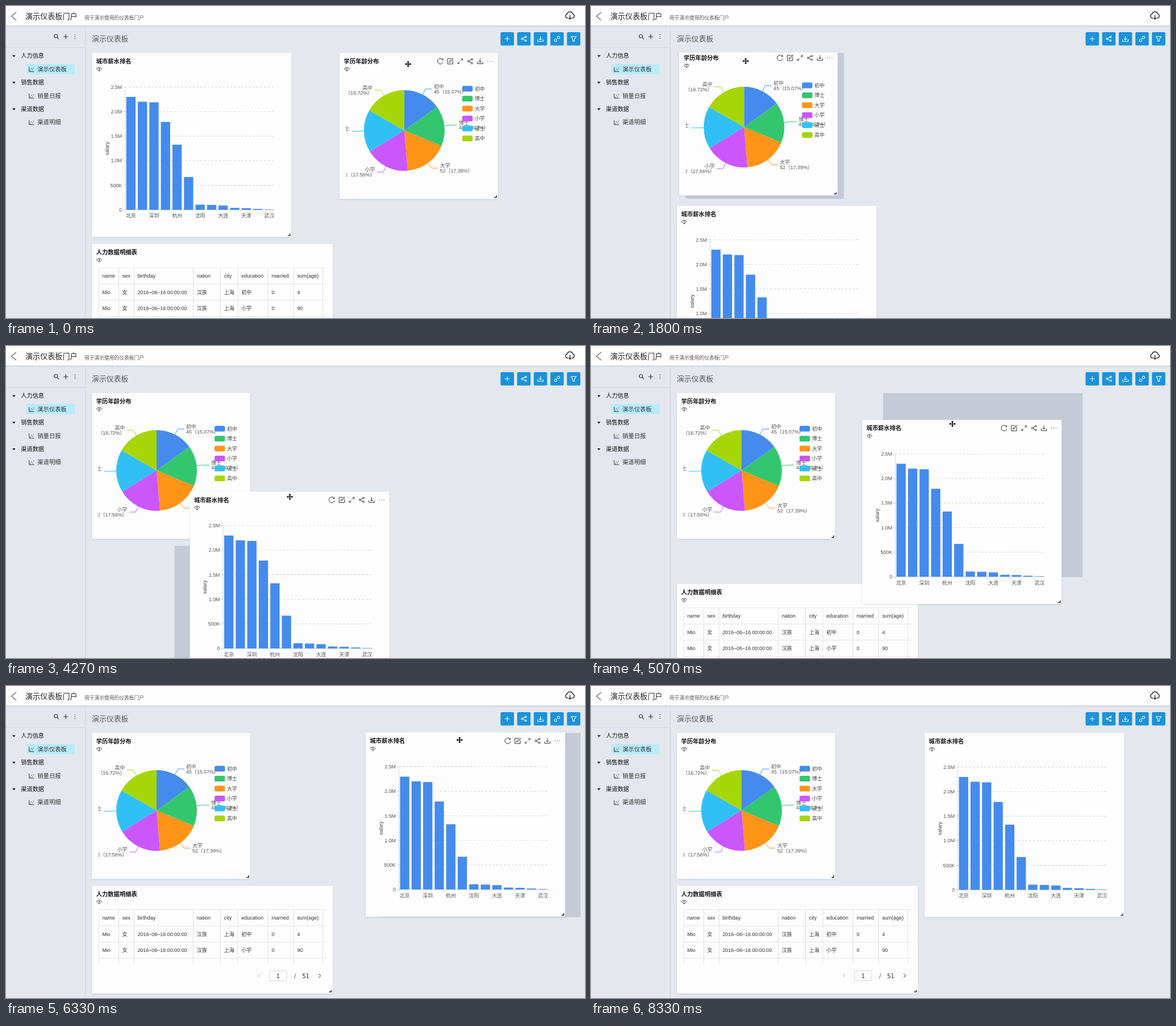
An HTML page with a canvas for the animation above (8390 ms loop, 1019 px wide and 549 px high).

```html
<!DOCTYPE html>
<html lang="zh-CN">
<head>
<meta charset="utf-8">
<title>演示仪表板</title>
<style>
html, body { margin: 0; width: 100%; height: 100%; overflow: hidden; background: #e4e8ee; }
canvas { display: block; width: 1019px; height: 549px; }
</style>
</head>
<body>
<canvas id="stage"></canvas>
<script>
const W = 1019, H = 549, LOOP = 8390, STEP = 200 / 3;
const canvas = document.getElementById('stage');
const ctx = canvas.getContext('2d');
const dpr = window.devicePixelRatio || 1;
canvas.width = W * dpr;
canvas.height = H * dpr;

// Grid
const PX = 72.65, PY = 67.2, X0 = 151.2, Y0 = 82.7, GAP = 12;
const colX = c => X0 + c * PX, rowY = r => Y0 + r * PY;
const span = (n, pitch) => n * pitch - GAP;
const snap = x => Math.round((x - X0) / PX);

// Timing
const PIE_GRAB = 520, PIE_DROP = 2070, BAR_GRAB = 3640, BAR_DROP = 6960, LEAVE = 7600;
const SLOT_MS = 125, CARD_MS = 200;
const LAG = 18, PIE_GRIP = [120.6, 19.5], BAR_GRIP = [166.3, 12.8];
const PIE_PATH = [[520, 587.1, 82.7], [700, 574, 82], [850, 520, 79], [917, 478, 76.5], [1000, 430, 73.9],
  [1100, 380, 72.5], [1300, 310, 74], [1550, 262, 72], [1740, 187, 75.2], [1800, 155.5, 76.8], [1900, 147, 80], [2070, 150, 82]];
const BAR_PATH = [[3640, 151.2, 351.5], [3900, 175, 340], [4200, 290, 270], [4500, 450, 215], [4750, 538, 195],
  [4980, 515, 165], [5067, 477, 129.9], [5170, 444, 104], [5350, 458, 92], [5600, 560, 88], [5850, 628, 84],
  [6080, 648, 82], [6333, 633, 82.1], [6600, 618, 83], [6960, 600, 84]];

const clamp = v => Math.min(1, Math.max(0, v));

// Cubic Hermite through the points, flat at turning points
function along(path, t, k) {
  const n = path.length - 1;
  if (t <= path[0][0]) return path[0][k];
  if (t >= path[n][0]) return path[n][k];
  const i = path.findIndex(p => p[0] > t) - 1;
  const slope = j => {
    if (j < 1 || j >= n) return 0;
    const [a, b, c] = [path[j - 1], path[j], path[j + 1]];
    return (b[k] - a[k]) * (c[k] - b[k]) <= 0 ? 0 : (c[k] - a[k]) / (c[0] - a[0]);
  };
  const a = path[i], b = path[i + 1], d = b[0] - a[0], u = (t - a[0]) / d, v = 1 - u;
  return a[k] * (1 + 2 * u) * v * v + b[k] * u * u * (3 - 2 * u) + d * u * v * (v * slope(i) - u * slope(i + 1));
}

// CSS "ease": cubic-bezier(.25, .1, .25, 1)
function ease(x) {
  x = clamp(x);
  let lo = 0, hi = 1, s = x;
  for (let i = 0; i < 20; i++) {
    s = (lo + hi) / 2;
    if (.75 * s * (1 - s) + s ** 3 < x) lo = s; else hi = s;
  }
  return .3 * s * (1 - s) ** 2 + 3 * s * s * (1 - s) + s ** 3;
}

// A value that follows a jumping goal with a CSS-like transition
function track(goal, ms) {
  const legs = [{ t: -1e4, from: goal(0), to: goal(0) }];
  const at = t => {
    let i = legs.length - 1;
    while (i && legs[i].t > t) i--;
    const { t: start, from, to } = legs[i];
    return from + (to - from) * ease((t - start) / ms);
  };
  for (let t = 0; t < LOOP; t++) {
    const to = goal(t);
    if (to !== legs[legs.length - 1].to) legs.push({ t, from: at(t), to });
  }
  return at;
}

const pieCol = t => t >= PIE_DROP ? 0 : snap(along(PIE_PATH, t, 1));
const barCol = t => t >= BAR_DROP ? 6 : snap(along(BAR_PATH, t, 1));
const barRow = t => t < BAR_GRAB ? (pieCol(t) < 5 ? 4 : 0) : (barCol(t) < 4 ? 4 : 0);
const tableRow = t => t < BAR_GRAB ? barRow(t) + 5 : barCol(t) < 4 ? 9 : barCol(t) < 6 ? 5 : 4;
const pieSlotX = track(t => colX(pieCol(t)), SLOT_MS);
const barSlotX = track(t => colX(barCol(t)), SLOT_MS);
const barSlotY = track(t => rowY(barRow(t)), SLOT_MS);
const barY = track(t => rowY(barRow(t)), CARD_MS);
const tableY = track(t => rowY(tableRow(t)), CARD_MS);

function settle(path, t, drop, x, y) {
  const u = ease((t - drop) / CARD_MS), px = along(path, t, 1), py = along(path, t, 2);
  return [px + (x - px) * u, py + (y - py) * u];
}

function pointer(t) {
  if (t > LEAVE) return null;
  if (t < PIE_DROP) return [1, 2].map(k => along(PIE_PATH, t + LAG, k) + PIE_GRIP[k - 1]);
  if (t >= BAR_GRAB) return [1, 2].map(k => along(BAR_PATH, t + LAG, k) + BAR_GRIP[k - 1]);
  const u = clamp((t - 2250) / 800), s = u * u * (3 - 2 * u);
  return [271 + 46.5 * s, 101.5 + 262.8 * s];
}

// Drawing helpers
const FONT = '"Liberation Sans", "Noto Sans CJK SC", "Noto Sans CJK", sans-serif';
function text(s, x, y, size = 8.9, color = '#444', align = 'left', weight = 400, family = FONT) {
  ctx.font = `${weight} ${size}px ${family}`;
  ctx.textAlign = align;
  ctx.fillStyle = color;
  ctx.fillText(s, x, y + size * .36);
}
function rect(x, y, w, h, color, r = 0) {
  ctx.fillStyle = color;
  ctx.beginPath();
  if (r) ctx.roundRect(x, y, w, h, r); else ctx.rect(x, y, w, h);
  ctx.fill();
}
function line(points, color, width = 1) {
  ctx.strokeStyle = color;
  ctx.lineWidth = width;
  ctx.beginPath();
  points.forEach(([x, y]) => ctx.lineTo(x, y));
  ctx.stroke();
}
function clipped(x, y, w, h, draw) {
  ctx.save();
  ctx.beginPath();
  ctx.rect(x, y, w, h);
  ctx.clip();
  draw();
  ctx.restore();
}
const ring = (x, y, r) => `M${x - r} ${y}a${r} ${r} 0 1 0 ${2 * r} 0a${r} ${r} 0 1 0 ${-2 * r} 0`;
const ICONS = {
  refresh: 'M4.3 -2.6A5 5 0 1 0 4.9 1M4.6 -5V-2.4H2',
  edit: 'M1.5 -4.6H-4.8V4.8H4.6V-1M-2 2L-1.6 .2L4 -5.4L5.4 -4L-.2 1.6Z',
  expand: 'M1.6 -4.2H4.2V-1.6M4.2 -4.2L.8 -.8M-1.6 4.2H-4.2V1.6M-4.2 4.2L-.8 .8',
  share: 'M-1.8 -.8L2 -2.8M-1.8 .8L2 2.8' + ring(-3.1, 0, 1.5) + ring(3.2, -3.3, 1.4) + ring(3.2, 3.3, 1.4),
  download: 'M0 -4.8V1.8M-2.4 -.4L0 2L2.4 -.4M-4.8 1V4.4H4.8V1',
  more: 'M-4.6 0h1.2M-.6 0h1.2M3.4 0h1.2',
  plus: 'M-4.2 0H4.2M0 -4.2V4.2',
  link: 'M-1.8 1.8L1.8 -1.8M-.4 -2.5L1.2 -4A2 2 0 0 1 4.1 -1.2L2.5 .4M.4 2.5L-1.2 4A2 2 0 0 1 -4.1 1.2L-2.5 -.4',
  filter: 'M-4.4 -4H4.4L1.4 .3V4.2H-1.4V.3Z',
  search: ring(-1, -1, 3) + 'M1.2 1.2L4.4 4.4',
  dots: 'M0 -4v1.3M0 -.6v1.3M0 2.8v1.3',
  chart: 'M-4.2 -4V4H4.4M-1.8 1.2v1.4M-.4 -1.6v1.4M1.6 .2v1.4M3.4 -2.8v1.4',
  cloud: 'M-3 4.2H-4.4A3.6 3.6 0 0 1 -5.2 -2.8A5.4 5.4 0 0 1 5.2 -2.8A3.6 3.6 0 0 1 4.4 4.2H3M0 -1V6M-2.2 3.9L0 6.2L2.2 3.9',
  widget: 'M-4.8 -.8Q0 -5.4 4.8 -.8L0 3.6ZM-1.6 -2.4L0 0L1.6 -2.4M0 0V3.4'
};
function icon(name, x, y, color = '#333', width = 1) {
  ctx.save();
  ctx.translate(x, y);
  ctx.strokeStyle = color;
  ctx.lineWidth = width;
  ctx.stroke(new Path2D(ICONS[name]));
  ctx.restore();
}

function card(title, w, h, hover) {
  ctx.save();
  ctx.shadowColor = 'rgba(40,50,80,.16)';
  ctx.shadowBlur = 3 * dpr;
  ctx.shadowOffsetY = dpr;
  rect(0, 0, w, h, '#fdfdfe', 1);
  ctx.restore();
  text(title, 7.5, 14.6, 10.3, '#111', 'left', 700);
  icon('widget', 12.8, 28.4, '#333', .8);
  line([[w - 2.6, h - 6.2], [w - 2.6, h - 2.8], [w - 6.4, h - 2.8]], '#222', 1.4);
  if (hover) ['refresh', 'edit', 'expand', 'share', 'download', 'more']
    .forEach((name, i) => icon(name, w - 101.3 + i * 17.5, 14.5));
}

const SLICES = [['初中', 15.07, 45, '#448bed'], ['博士', 16.2, 48, '#34c66e'], ['大学', 17.39, 52, '#ff9419'],
  ['小学', 17.56, 52, '#cb56f9'], ['硕士', 17.06, 51, '#31c0f5'], ['高中', 16.72, 50, '#a6d608']];
function pieCard(hover) {
  const w = span(4, PX), cx = 113.8, cy = 136.3, r = 71;
  card('学历年龄分布', w, span(4, PY), hover);
  clipped(11.3, 36, w - 22.6, 210, () => {
    let a = -Math.PI / 2;
    for (const [name, share, count, color] of SLICES) {
      const b = a + share / 50 * Math.PI, m = (a + b) / 2, side = Math.cos(m) < 0 ? -1 : 1;
      ctx.fillStyle = color;
      ctx.beginPath();
      ctx.moveTo(cx, cy);
      ctx.arc(cx, cy, r, a, b);
      ctx.fill();
      const at = d => [cx + d * Math.cos(m), cy + d * Math.sin(m)];
      const [ex, ey] = at(r + 11), tx = ex + side * 14.6, align = side < 0 ? 'right' : 'left';
      line([at(r), [ex, ey], [ex + side * 11, ey]], color);
      text(name, tx, ey - 4.2, 8.9, '#555', align);
      text(`${count}（${share}%）`, tx, ey + 4.5, 8.9, '#555', align);
      a = b;
    }
    SLICES.forEach(([name, , , color], i) => {
      const y = 62.8 + i * 17.5;
      rect(215.9, y - 5.1, 18.3, 10.2, color, 2.6);
      text(name, 237.8, y, 8.9, '#444');
    });
  });
}

const SALARY = [2.297, 2.2, 2.187, 1.79, 1.327, .667, .106, .1, .088, .04, .034, .02, .008];
const CITIES = ['北京', '深圳', '杭州', '沈阳', '大连', '天津', '武汉'];
function barCard(hover) {
  const left = 58.5, right = 322.4, base = 276, tall = 216.2, pitch = (right - left) / 13;
  card('城市薪水排名', span(5, PX), span(5, PY), hover);
  ['0', '500K', '1.0M', '1.5M', '2.0M', '2.5M'].forEach((label, i) => {
    const y = base - tall * i / 5;
    text(label, 53, y, 8.9, '#555', 'right');
    line([[left - 4, y], [left, y]], '#ccc', .8);
    if (!i) return;
    ctx.setLineDash([3.7, 2.9]);
    line([[left, y], [right, y]], '#cfcfd2', .8);
    ctx.setLineDash([]);
  });
  line([[left, base - tall], [left, base], [right, base]], '#cfcfd2', .8);
  SALARY.forEach((v, i) => {
    const h = v / 2.5 * tall;
    rect(left + pitch * i + 2, base - h, pitch - 4, h, '#448bed');
  });
  CITIES.forEach((city, i) => {
    const x = left + pitch * (2 * i + .5);
    line([[x - pitch / 2, base], [x - pitch / 2, base + 3.5]], '#ccc', .8);
    text(city, x, 286.5, 8.9, '#555', 'center');
  });
  ctx.save();
  ctx.translate(26.3, 168);
  ctx.rotate(-Math.PI / 2);
  text('salary', 0, 0, 9, '#444', 'center');
  ctx.restore();
}

const EDGES = [12, 47.3, 74, 178.3, 226.3, 256.8, 310, 355, 406.3];
const ROWS = [['name', 'sex', 'birthday', 'nation', 'city', 'education', 'married', 'sum(age)'],
  ['Mio', '女', '2016–06–16 00:00:00', '汉族', '上海', '初中', '0', '4'],
  ['Mio', '女', '2016–06–16 00:00:00', '汉族', '上海', '小学', '0', '90']];
function tableCard(hover) {
  const grid = '#e3e3e6', pitch = 28.5;
  card('人力数据明细表', span(6, PX), span(3, PY), hover);
  clipped(11.5, 41.5, 401, 96.5, () => {
    for (let i = 0; i < 4; i++) line([[12, 42 + i * pitch], [413, 42 + i * pitch]], grid);
    EDGES.forEach(x => line([[x, 42], [x, 140]], grid));
    ROWS.forEach((row, i) => row.forEach((s, j) =>
      text(s, EDGES[j] + 6.2, 56.5 + i * pitch, 8.95, '#333')));
  });
  const y = 158.4, num = '"DejaVu Sans", sans-serif';
  line([[296.5, y - 3.5], [292.5, y], [296.5, y + 3.5]], '#bbb');
  ctx.strokeStyle = '#d5d5d8';
  ctx.beginPath();
  ctx.roundRect(312.5, y - 8.8, 30.3, 17.6, 2);
  ctx.stroke();
  text('1', 327.7, y, 10, '#333', 'center', 400, num);
  text('/', 357.5, y, 10, '#555', 'center', 400, num);
  text('51', 376.3, y, 10, '#333', 'center', 400, num);
  line([[398.8, y - 3.5], [402.8, y], [398.8, y + 3.5]], '#333');
}

function chrome() {
  rect(0, 0, W, 34.4, '#fefefe');
  rect(0, 34.4, W, 1, '#c6cad0');
  rect(0, 35.4, W, 1, '#d6dae0');
  line([[18, 11], [9.5, 18], [18, 25]], '#666', 1.2);
  text('演示仪表板门户', 34, 18.5, 13.1, '#222');
  text('用于演示使用的仪表板门户', 138, 20.8, 8.75, '#555');
  icon('cloud', 992.5, 17, '#222', 1.3);

  rect(139, 36, 1, H, '#d3d7dd');
  rect(0, 72.5, 139, 1, '#d3d7dd');
  icon('search', 88.8, 54, '#333', 1.2);
  icon('plus', 105.2, 54, '#333', 1.2);
  icon('dots', 121.5, 54, '#333', 1.3);
  rect(36, 102, 85, 18, '#b8ecfd');
  [['人力信息', '演示仪表板'], ['销售数据', '销量日报'], ['渠道数据', '渠道明细']].forEach(([group, item], i) => {
    const y = 88 + i * 46.7;
    ctx.fillStyle = '#222';
    ctx.beginPath();
    [[11, y - 1.5], [16.8, y - 1.5], [13.9, y + 2]].forEach(p => ctx.lineTo(...p));
    ctx.fill();
    text(group, 26.3, y - .2, 10.2, '#111', 'left', 500);
    icon('chart', 45, y + 23.4, '#333', 1);
    text(item, 55.3, y + 23.3, 10.3, '#333');
  });

  text('演示仪表板', 151, 57.8, 12.9, '#555');
  ['plus', 'share', 'download', 'link', 'filter'].forEach((name, i) => {
    const x = 882.2 + i * 29.2;
    rect(x - 11.8, 46, 23.6, 23.6, '#1b92dc', 2);
    icon(name, x, 57.8, '#fff', 1.05);
  });
}

function moveCursor(x, y) {
  ctx.save();
  ctx.translate(x, y);
  const shape = new Path2D();
  [0, 1, 2, 3].forEach(i => shape.addPath(
    new Path2D('M-.7 0V-3H-2.4L0 -5.6L2.4 -3H.7V0Z'), new DOMMatrix().rotate(i * 90)));
  ctx.strokeStyle = '#fff';
  ctx.lineWidth = 1.8;
  ctx.stroke(shape);
  ctx.fillStyle = '#000';
  ctx.fill(shape);
  ctx.restore();
}

function draw(t) {
  ctx.setTransform(dpr, 0, 0, dpr, 0, 0);
  rect(0, 0, W, H, '#e4e8ee');
  chrome();

  const dragPie = t >= PIE_GRAB && t < PIE_DROP, dragBar = t >= BAR_GRAB && t < BAR_DROP;
  const pie = { pos: settle(PIE_PATH, t, PIE_DROP, X0, Y0), cols: 4, rows: 4, paint: pieCard, drag: dragPie };
  const bar = {
    pos: t < BAR_GRAB ? [X0, barY(t)] : settle(BAR_PATH, t, BAR_DROP, colX(6), Y0),
    cols: 5, rows: 5, paint: barCard, drag: dragBar
  };
  const table = { pos: [X0, tableY(t)], cols: 6, rows: 3, paint: tableCard };
  const cards = t < BAR_GRAB ? [table, bar, pie] : [table, pie, bar];

  const mouse = pointer(t);
  const under = ({ pos: [x, y], cols, rows }) => mouse && mouse[0] > x && mouse[0] < x + span(cols, PX) &&
    mouse[1] > y && mouse[1] < y + span(rows, PY);
  const hovered = cards.find(c => c.drag) || cards.slice().reverse().find(under);

  clipped(140, 82, W - 140, H - 82, () => {
    for (const c of cards) {
      if (c.drag) {
        const x = dragPie ? pieSlotX(t) : barSlotX(t), y = dragPie ? Y0 : barSlotY(t);
        rect(x, y, span(c.cols, PX), span(c.rows, PY), 'rgba(78,82,123,.2)');
      }
      ctx.save();
      ctx.translate(...c.pos);
      c.paint(c === hovered);
      ctx.restore();
    }
  });
  if (mouse && hovered) moveCursor(...mouse);
}

const start = performance.now();
function tick() {
  const t = (performance.now() - start) % LOOP;
  draw(Math.min(125, Math.floor((t + 4) / STEP)) * STEP);
  requestAnimationFrame(tick);
}
tick();
</script>
</body>
</html>
```
